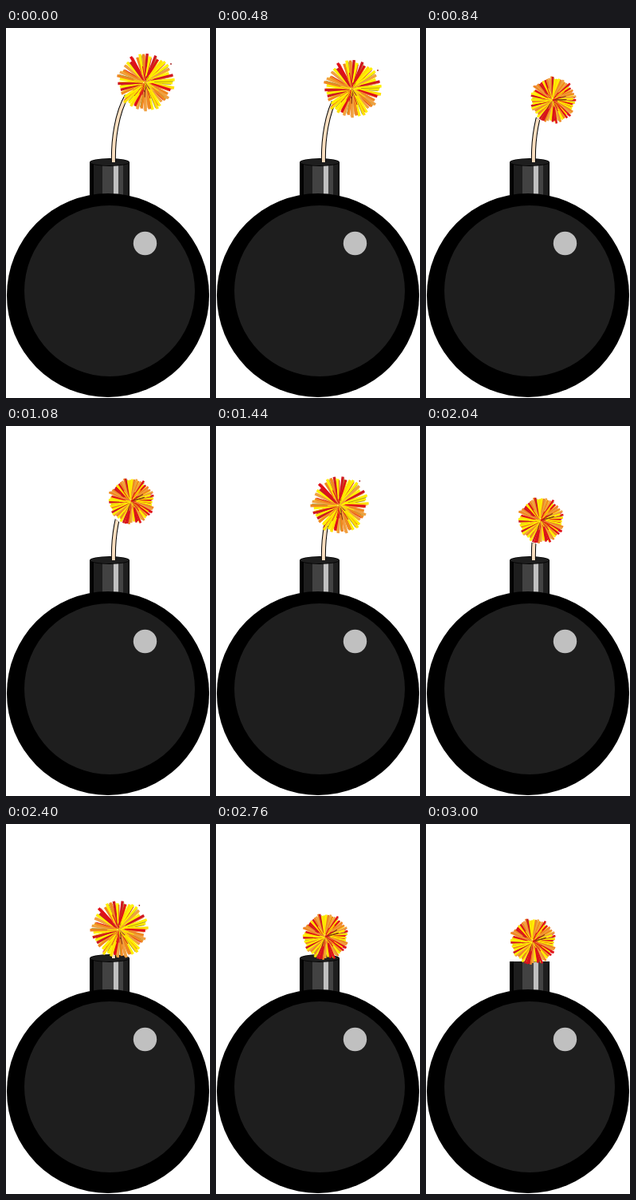
Recreate the animation shown at these times as an HTML page with a canvas. Size 256 by 463 pixels, loop 3.12 s.

```html
<!DOCTYPE html>
<html lang="en">
<head>
<meta charset="utf-8">
<title>Burning fuse</title>
<style>
  html, body { margin: 0; width: 100%; height: 100%; overflow: hidden; background: #fff; }
  canvas { display: block; }
</style>
</head>
<body>
<canvas id="stage" width="256" height="463"></canvas>
<script>
const ctx = document.getElementById('stage').getContext('2d');
const STEP = 120;
const STEPS = 26;
const TAU = Math.PI * 2;
const DARK = '#1e1e1e';
const GREY = '#424242';
const LIGHT = '#c0c0c0';

// Key points of the spark's way down the fuse.
const keys = [
  { step: 0, x: 175, y: 68 },
  { step: 4, x: 171, y: 76 },
  { step: 7, x: 159, y: 90 },
  { step: 12, x: 155, y: 99 },
  { step: 15, x: 146, y: 109 },
  { step: 20, x: 142, y: 132 },
  { step: 25, x: 134, y: 147 }
];
const hues = ['#e01018', '#fff000', '#f08820', '#ffe000', '#d01820', '#f0a040', '#fff000'];

function sparkAt(step) {
  const next = Math.max(1, keys.findIndex(key => key.step >= step));
  const a = keys[next - 1];
  const b = keys[next];
  const t = (step - a.step) / (b.step - a.step);
  return { x: Math.round(a.x + (b.x - a.x) * t), y: Math.round(a.y + (b.y - a.y) * t) };
}

function random(seed) {
  return () => {
    seed = (seed * 16807) % 2147483647;
    return seed / 2147483647;
  };
}

function disc(x, y, rx, ry, fill) {
  ctx.fillStyle = fill;
  ctx.beginPath();
  ctx.ellipse(x, y, rx, ry, 0, 0, TAU);
  ctx.fill();
}

function band(x, width, fill) {
  ctx.fillStyle = fill;
  ctx.fillRect(x, 168, width, 46);
}

function ray(angle, from, to, width, color) {
  const c = Math.cos(angle);
  const s = Math.sin(angle);
  ctx.lineWidth = width;
  ctx.strokeStyle = color;
  ctx.beginPath();
  ctx.moveTo(c * from, s * from);
  ctx.lineTo(c * to, s * to);
  ctx.stroke();
}

function drawCap(burnt) {
  band(105, 50, '#000');
  band(110, 11, DARK);
  band(121, 14, GREY);
  band(135, 6, LIGHT);
  band(141, 6, GREY);
  band(147, 6, DARK);
  disc(130, 168, 25, 5, '#000');
  disc(130, 168, 24, 4, DARK);
  if (burnt) {
    ctx.fillStyle = '#fff';
    ctx.fillRect(104, 160, 52, 12);
  }
}

function drawBody() {
  disc(128, 334.5, 127, 127.5, '#000');
  disc(130, 329, 107, 107, DARK);
  disc(174.5, 269.5, 14.7, 14.7, LIGHT);
}

// Only the part below the spark and outside its halo is left.
function drawFuse(spark) {
  ctx.save();
  ctx.beginPath();
  ctx.rect(0, spark.y, 256, 168 - spark.y);
  ctx.clip();
  ctx.beginPath();
  ctx.rect(0, 0, 256, 463);
  ctx.arc(spark.x, spark.y, 30, 0, TAU);
  ctx.clip('evenodd');
  ctx.beginPath();
  ctx.moveTo(135, 170);
  ctx.bezierCurveTo(134, 140, 139, 106, 152, 84);
  for (const [width, color] of [[6, '#000'], [4, '#fbdfc0']]) {
    ctx.lineWidth = width;
    ctx.strokeStyle = color;
    ctx.stroke();
  }
  ctx.restore();
}

function drawSpark({ x, y }, big, angle) {
  const rand = random(big ? 421700 : 918100);
  const pick = () => hues[Math.floor(rand() * hues.length)];
  const count = big ? 45 : 64;
  const radius = big ? 37 : 30;
  ctx.save();
  ctx.translate(x, y);
  ctx.rotate(angle);
  for (let i = 0; i < count; i++) {
    const a = (i + rand() * 0.5) / count * TAU;
    const length = radius * (0.84 + 0.16 * rand());
    ray(a, 3, length, big ? 3.4 : 2.6, hues[(i * 3 + Math.floor(rand() * 2)) % hues.length]);
    ray(a + 0.06, radius * 0.3, length * 0.95, 0.8, i % 4 ? pick() : '#a89018');
  }
  // Thin streaks give the core its mottled look.
  for (let i = 0; i < 36; i++) {
    ray(rand() * TAU, 0, radius * (0.2 + 0.4 * rand()), 1, i % 6 ? pick() : '#803010');
  }
  if (big) disc(32, -23, 0.9, 0.9, '#a01818');
  ctx.restore();
}

function draw(now) {
  const step = Math.floor(now / STEP) % STEPS;
  const spark = sparkAt(step);
  ctx.fillStyle = '#fff';
  ctx.fillRect(0, 0, 256, 463);
  drawCap(spark.y > 143);
  drawFuse(spark);
  drawBody();
  drawSpark(spark, step % 2 === 0, step < 8 ? 0 : -0.25);
}

const start = performance.now();
function tick() {
  draw(performance.now() - start);
  requestAnimationFrame(tick);
}
tick();
</script>
</body>
</html>
```
